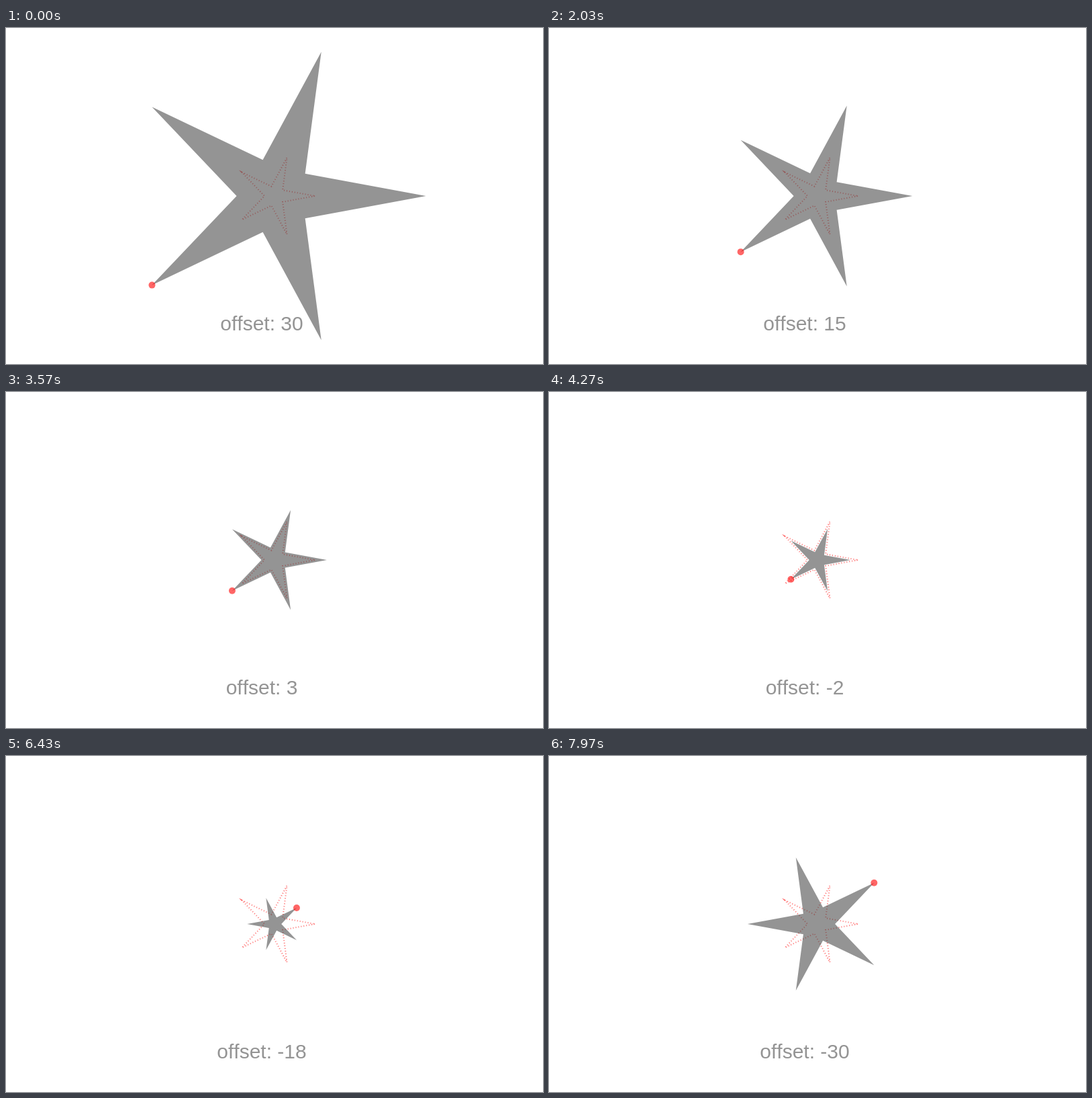
Write an HTML page with a canvas that moves like this. It is 800x500 px and loops after 8 s.

```html
<!DOCTYPE html>
<html lang="en">
<head>
<meta charset="utf-8">
<title>Polygon offset</title>
<style>
  html, body { margin: 0; width: 100%; height: 100%; overflow: hidden; background: #fff; }
  canvas { display: block; }
</style>
</head>
<body>
<canvas id="stage" width="800" height="500"></canvas>
<script>
const ctx = document.getElementById('stage').getContext('2d');
const LOOP = 8000;
const CENTER = { x: 400, y: 250 };
const RADIUS = 60, RATIO = 0.25, POINTS = 5;
const RED = 'rgba(255,0,0,0.6)', GREY = 'rgba(77,77,77,0.6)';

// Distance from the centre to any edge line of the base star.
const step = Math.PI / POINTS;
const inner = { x: RADIUS * RATIO * Math.cos(step), y: RADIUS * RATIO * Math.sin(step) };
const edgeDistance = RADIUS * inner.y / Math.hypot(RADIUS - inner.x, inner.y);

function polar(radius, angle) {
  return [CENTER.x + radius * Math.cos(angle), CENTER.y + radius * Math.sin(angle)];
}

function starPath(radius) {
  ctx.beginPath();
  for (let i = 0; i < POINTS * 2; i++) {
    ctx.lineTo(...polar(i % 2 ? radius * RATIO : radius, i * step));
  }
  ctx.closePath();
}

function roundHalfEven(value) {
  const low = Math.floor(value);
  const odd = Math.abs(low % 2) === 1;
  const rounded = value - low === 0.5 ? low + (odd ? 1 : 0) : Math.round(value);
  return rounded + 0;
}

function draw(time) {
  const tick = Math.floor(time * 0.03 + 0.15) % 240;
  const offset = 30 - tick / 4;
  // Offsetting every edge equally scales the star; below zero it turns inside out.
  const radius = RADIUS * (1 + offset / edgeDistance);

  ctx.fillStyle = '#fff';
  ctx.fillRect(0, 0, 800, 500);

  ctx.strokeStyle = RED;
  ctx.lineWidth = 2;
  ctx.setLineDash([1, 3]);
  starPath(RADIUS);
  ctx.stroke();

  ctx.fillStyle = GREY;
  starPath(radius);
  ctx.fill();

  ctx.font = '30px "Liberation Sans", Helvetica, Arial, sans-serif';
  ctx.fontKerning = 'none';
  ctx.textAlign = 'center';
  ctx.fillText('offset: ' + roundHalfEven(offset), 381, 450);

  ctx.fillStyle = RED;
  ctx.beginPath();
  ctx.arc(...polar(radius, 4 * step), 5, 0, Math.PI * 2);
  ctx.fill();
}

function frame() {
  draw(performance.now() % LOOP);
  requestAnimationFrame(frame);
}
frame();
</script>
</body>
</html>
```
